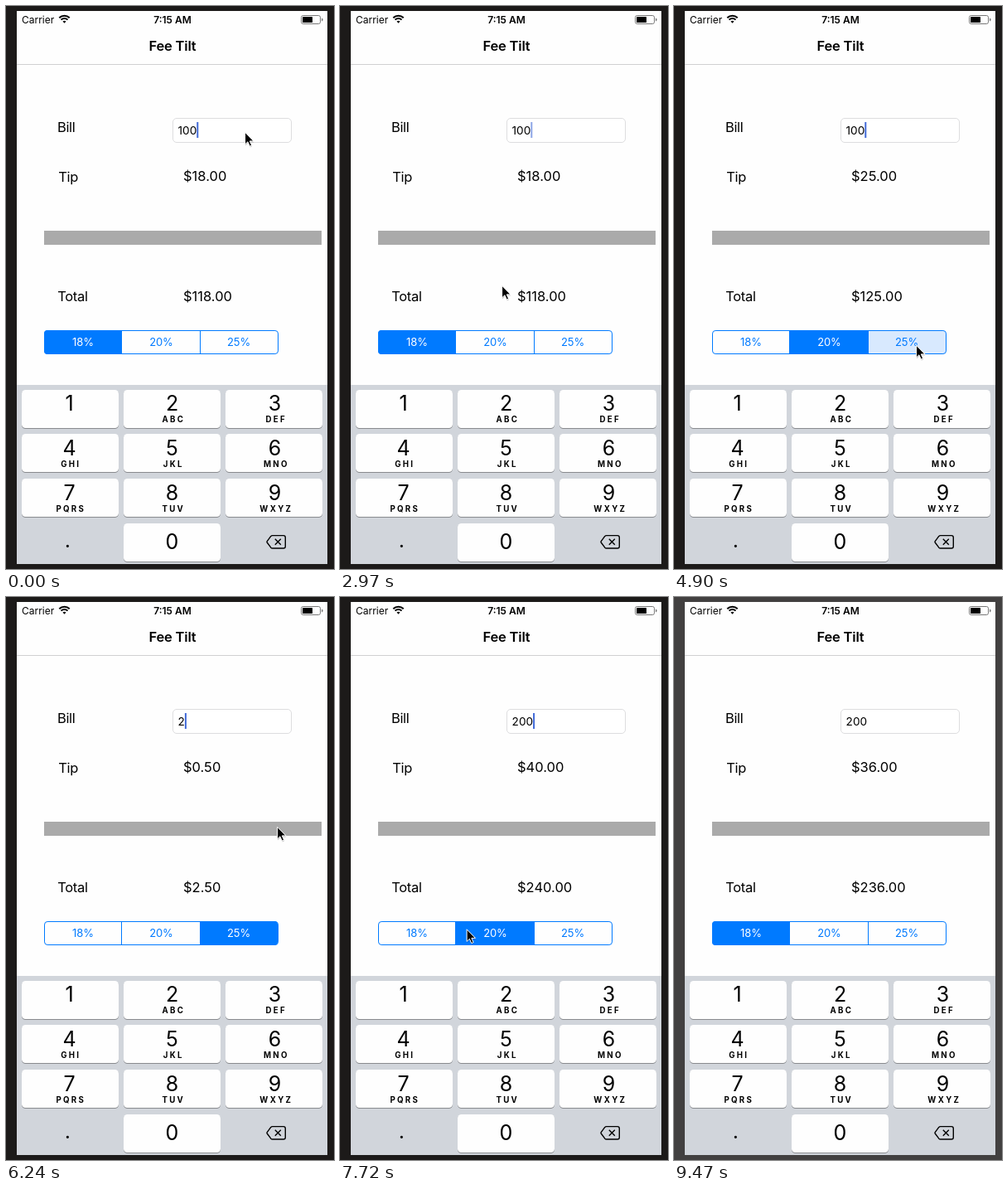
These frames come from a looping animation (396 by 679 pixels, 9570 ms). An HTML page:

```html
<!DOCTYPE html>
<html lang="en">
<head>
<meta charset="utf-8">
<title>Fee Tilt</title>
<style>
  html, body { margin: 0; width: 100%; height: 100%; overflow: hidden; background: #1c1a19; }
  svg { display: block; width: 396px; height: 679px; font-family: Inter, Roboto, sans-serif; }
  text { white-space: pre; }
  .label { font-size: 16.5px; letter-spacing: -.35px; }
  .money { font-size: 16.5px; }
  .digit { font-size: 25px; text-anchor: middle; }
  .abc { font-size: 9.7px; font-weight: 700; letter-spacing: 2.3px; text-anchor: middle; }
  .seg { font-size: 13px; text-anchor: middle; letter-spacing: -.1px; }
</style>
</head>
<body>
<svg viewBox="0 0 396 679">
  <rect id="bezel" width="396" height="679"/>
  <rect x="13" y="6" width="375" height="667" fill="#fefefe"/>

  <!-- status bar -->
  <text x="19" y="20.5" font-size="12">Carrier</text>
  <g fill="none" stroke="#000" stroke-width="2">
    <path d="M64.3 14.3a8.7 8.7 0 0 1 12.4 0M66.5 16.6a5.7 5.7 0 0 1 8 0"/>
    <path d="M70.5 20.8l-2-2.2a2.9 2.9 0 0 1 4 0z" fill="#000" stroke="none"/>
  </g>
  <text x="201" y="20.5" font-size="12" font-weight="600" text-anchor="middle">7:15 AM</text>
  <rect x="356.5" y="11.5" width="23" height="10" rx="2.2" fill="none" stroke="#777"/>
  <rect x="358" y="13" width="12" height="7" rx=".6"/>
  <path d="M381 14.6q1.6 .4 1.6 1.9t-1.6 1.9z" fill="#777"/>

  <!-- navigation bar -->
  <text x="201" y="54" font-size="16.5" font-weight="600" letter-spacing="-.2" text-anchor="middle">Fee Tilt</text>
  <rect x="13" y="70" width="375" height="1" fill="#d0d0d1"/>

  <!-- form -->
  <g class="label">
    <text x="62" y="152">Bill</text>
    <text x="63.3" y="212">Tip</text>
    <text x="62.3" y="356">Total</text>
  </g>
  <g class="money">
    <text id="tip" x="214" y="211"></text>
    <text id="total" x="214" y="356"></text>
  </g>
  <rect x="201.5" y="135.5" width="143" height="29" rx="4.5" fill="#fff" stroke="#dddddf"/>
  <text id="bill" x="207.6" y="155" font-size="13.6"></text>
  <rect id="caret" y="140" width="2" height="19" fill="#426bd8"/>
  <rect x="46" y="271" width="335" height="17" fill="#aaa"/>

  <g id="segs"></g>
  <rect x="13" y="457" width="375" height="216" fill="#d1d5db"/>
  <g id="keys"></g>

  <g fill="none" stroke="#000" stroke-width="1.4" stroke-linejoin="round">
    <path d="M321.6 638.6H335q2.3 0 2.3 2.3v10.8q0 2.3-2.3 2.3h-13.4q-1 0-1.8-.8l-4.6-6.2q-.5-.7 0-1.4l4.6-6.2q.8-.8 1.8-.8z"/>
    <path d="M324.8 642.8l7 7m0-7l-7 7"/>
  </g>

  <g id="pointer">
    <path d="M.6 .8V15.4L3.9 12.3 6.3 17.6 8.6 16.6 6.3 11.4H11z" opacity=".2" transform="translate(.4 1)"/>
    <path d="M.6 .3V14.9L3.9 11.8 6.3 17.1 8.6 16.1 6.3 10.9H11z" stroke="#fff" stroke-linejoin="round"/>
  </g>
</svg>
<script>
const LOOP = 9570, TICK = 148, BLUE = '#007aff';
const $ = id => document.getElementById(id);

function add(parent, tag, attrs, text = '') {
  const el = document.createElementNS('http://www.w3.org/2000/svg', tag);
  for (const k in attrs) el.setAttribute(k, attrs[k]);
  el.textContent = text;
  return parent.appendChild(el);
}

// Segmented control
const percents = [18, 20, 25];
const segs = percents.map((percent, i) => {
  const x = 46 + Math.floor(i * 94.4), w = i === 1 ? 95 : 94;
  const round = i === 0 ? '4px 0 0 4px' : i === 2 ? '0 4px 4px 0' : '0';
  const box = add($('segs'), 'rect', { x, y: 391, width: w, height: 29, style: `clip-path: inset(0 round ${round})` });
  const label = add($('segs'), 'text', { class: 'seg', x: x + w / 2, y: 410 }, percent + '%');
  return { box, label };
});
add($('segs'), 'rect', { x: 46.5, y: 391.5, width: 282, height: 28, rx: 3.6, fill: 'none', stroke: BLUE });
add($('segs'), 'path', { d: 'M139.5 391v29M234.5 391v29', stroke: BLUE });

// Number pad
function key(col, row, digit, sub) {
  const size = { x: 19 + col * 123, width: 117, height: 46, rx: 4.6 };
  const y = Math.floor(463 + row * 53.7), textX = 76.5 + col * 124, textY = 463 + row * 54;
  add($('keys'), 'rect', { ...size, y: y + 1, fill: '#898b8f' });
  add($('keys'), 'rect', { ...size, y, fill: '#fefefe' });
  add($('keys'), 'text', { class: 'digit', x: textX, y: textY + (sub === undefined ? 30 : 25) }, digit);
  add($('keys'), 'text', { class: 'abc', x: textX + 1.8, y: textY + 39 }, sub);
}
' ABC DEF GHI JKL MNO PQRS TUV WXYZ'.split(' ').forEach((sub, i) => key(i % 3, Math.floor(i / 3), i + 1, sub));
key(1, 3, 0);
add($('keys'), 'text', { class: 'digit', x: 74.3, y: 653 }, '.');

// Typing bursts, one key per tick; '<' is backspace
const bursts = [[9, '<<<'], [15, '100'], [39, '<<<200']];
// Taps: press tick, tick of the new amount, segment
const taps = [[24, 25, 1], [33, 33, 2], [50, 51, 1], [54, 54, 0]];
// Pointer trips: start tick, end tick, x, y
const trips = [[18, 20, 195, 337], [20, 23, 188, 404], [27, 31, 292, 409],
  [34, 37, 327, 277], [47, 50, 200, 402], [51, 53, 105, 399], [55, 58, 72, 509]];

function typed(n) {
  let text = '100', last = 0;
  for (const [start, keys] of bursts) {
    [...keys].forEach((k, i) => {
      if (start + i > n) return;
      text = k === '<' ? text.slice(0, -1) : text + k;
      last = start + i;
    });
  }
  return { text, last };
}

// Solid after a key, then a blink every seven ticks
function caretOpacity(idle) {
  const phase = (idle + 4) % 7;
  return idle < 3 || phase > 3 ? 1 : phase ? 0 : .6;
}

function pointerAt(n) {
  let x = 288, y = 152;
  for (const [from, to, toX, toY] of trips) {
    const p = Math.min(1, Math.max(0, (n - from) / (to - from)));
    const e = p * p * (3 - 2 * p);
    x += (toX - x) * e;
    y += (toY - y) * e;
  }
  return [x, y];
}

const money = v => '$' + v.toFixed(2);

function draw(t) {
  const n = Math.floor(t / TICK + .05);
  const { text, last } = typed(n);
  let picked = 0, pressed = -1, percent = percents[0];
  for (const [press, change, seg] of taps) {
    if (n === press) pressed = seg;
    if (n > press) picked = seg;
    if (n >= change) percent = percents[seg];
  }

  const tip = text * percent / 100;
  $('bill').textContent = text;
  $('tip').textContent = money(tip);
  $('total').textContent = money(+text + tip);
  $('caret').setAttribute('x', 207.6 + $('bill').getComputedTextLength());
  $('caret').setAttribute('opacity', caretOpacity(n - last));

  segs.forEach(({ box, label }, i) => {
    box.setAttribute('fill', i === picked ? BLUE : i === pressed ? '#d8e9fe' : '#fefefe');
    label.setAttribute('fill', i === picked ? '#fff' : BLUE);
  });
  $('pointer').setAttribute('transform', `translate(${pointerAt(n)})`);
  $('pointer').setAttribute('visibility', n < 59 ? 'visible' : 'hidden');
  $('bezel').setAttribute('fill', n < 64 ? '#1c1a19' : '#424040');
}

const start = performance.now();
function tick() {
  draw((performance.now() - start) % LOOP);
  requestAnimationFrame(tick);
}
tick();
</script>
</body>
</html>
```
